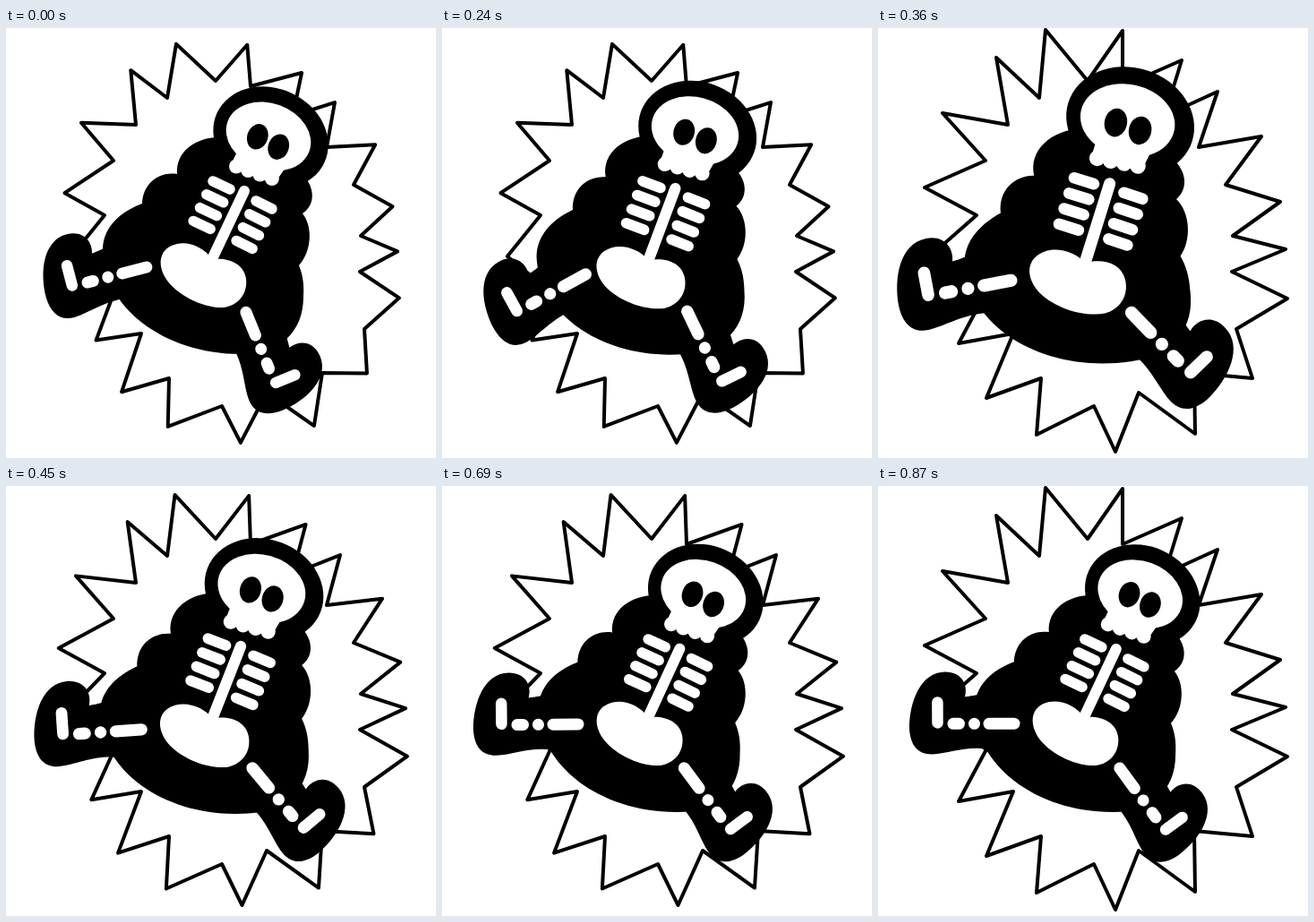
Animation of 480x480 px, one loop 900 ms. Source, as an HTML page with a canvas:

```html
<!DOCTYPE html>
<html lang="en">
<head>
<meta charset="utf-8">
<title>Dancing skeleton</title>
<style>
html, body { margin: 0; width: 100%; height: 100%; overflow: hidden; background: #fff; }
canvas { display: block; width: 480px; height: 480px; }
</style>
</head>
<body>
<canvas id="stage" width="480" height="480"></canvas>
<script>
const ctx = document.getElementById('stage').getContext('2d');
const LOOP = 900, STEP = 30, RAD = Math.PI / 180;

// Corners of the burst at full size: tips, and the notch after each tip.
const tips = [[187,2],[273,3],[339,36],[379,71],[428,121],[449,194],[455,247],[457,302],[418,391],
  [354,453],[265,473],[177,454],[121,413],[90,352],[60,253],[52,178],[72,95],[132,33]];
const notches = [[234,59],[273,65],[320,98],[358,133],[388,175],[396,232],[395,272],[400,336],[353,385],
  [291,407],[241,422],[182,391],[151,341],[121,294],[110,209],[120,148],[145,108],[180,78]];

const torso = new Path2D(`M245 122 C215 120 189 136 191 163 C172 160 153 172 152 196
  C128 205 108 222 108 248 C108 310 175 364 262 364 C305 364 332 340 332 300
  C333 285 331 275 327 265 C341 250 343 222 331 207 C345 198 347 178 328 160 L300 120Z`);
const pelvis = new Path2D(`M230 258 C222 246 205 238 191 241 C172 245 168 262 178 279
  C190 298 220 313 243 312 C258 310 270 298 268 280 C266 264 250 256 230 258Z`);
const jaw = new Path2D('M258 138 L250 155 L268 163 L297 172 L305 166 L316 150Z');

// Both legs share one shape: x runs from hip to foot, toes point to negative y.
const legSkin = new Path2D(`M-8 -30 L34 -34 C44 -31 48 -31 55 -30 C51 -43 58 -58 77 -58
  C104 -58 117 -25 117 5 C116 25 107 34 92 34 C72 33 57 25 30 28 L-13 35Z`);

function smooth(from, to, t) {
  const u = Math.min(1, Math.max(0, (t - from) / (to - from)));
  return u * u * (3 - 2 * u);
}

function poseAt(t) {
  const rise = smooth(80, 360, t);
  const settle = Math.exp(-Math.max(0, t - 360) / 125);
  const lean = rise * settle;
  const puff = rise ** 4 * settle ** 2;
  const kick = 1 - 0.48 * Math.exp(-t / 40);
  return {
    x: 220 + 3 * lean,
    y: 276 + 3 * lean + 4 * puff,
    turn: -8 * lean,
    size: 1 + 0.01 * lean + 0.087 * puff,
    left: -28 * kick * (1 - smooth(190, 400, t)),
    right: 26.5 * kick * (1 - smooth(145, 355, t))
  };
}

function ellipse(x, y, rx, ry, angle, color) {
  ctx.fillStyle = color;
  ctx.beginPath();
  ctx.ellipse(x, y, rx, ry, angle * RAD, 0, Math.PI * 2);
  ctx.fill();
}

function bone(x1, y1, x2, y2, width) {
  ctx.strokeStyle = '#fff';
  ctx.lineWidth = width;
  ctx.beginPath();
  ctx.moveTo(x1, y1);
  ctx.lineTo(x2 + 0.01, y2);
  ctx.stroke();
}

function fillPath(path, color) {
  ctx.fillStyle = color;
  ctx.fill(path);
}

// The tips swell from 0 (small) to 1 (full size); the notches stay put.
function drawBurst(swell) {
  const sx = 0.922 + 0.078 * swell, sy = 0.945 + 0.055 * swell;
  ctx.beginPath();
  tips.forEach(([x, y], i) => {
    ctx.lineTo(225 + (x - 225) * sx, 290 + (y - 290) * sy);
    ctx.lineTo(...notches[i]);
  });
  ctx.closePath();
  ctx.strokeStyle = '#000';
  ctx.lineWidth = 4;
  ctx.stroke();
}

function drawLeg(x, y, angle, flip, offsetX, offsetY) {
  ctx.save();
  ctx.translate(x, y);
  ctx.rotate(angle * RAD);
  ctx.scale(flip, 1);
  ctx.translate(offsetX, offsetY);
  fillPath(legSkin, '#000');
  bone(0, 0, 28, 0, 13);
  bone(44.5, 0, 44.5, 0, 13);
  bone(61.5, 0, 68, 0, 13);
  bone(85.5, -1, 85.5, -24, 12.5);
  ctx.restore();
}

function drawHead() {
  ellipse(295.5, 122.5, 66, 55, 25, '#000');
  ellipse(293, 121, 48.5, 37, 20, '#fff');
  fillPath(jaw, '#fff');
  for (let i = 0; i < 4; i++) ellipse(257 + 13.3 * i, 154.5 + 4.5 * i, 8, 8, 0, '#fff');
  for (const side of [-1, 1]) ellipse(292.5 + 11.7 * side, 127 + 5.7 * side, 11.5, 14.5, 20, '#000');
}

function drawRibs() {
  for (let i = 0; i < 4; i++) {
    const x = -7.3 * i, y = 14.8 * i;
    bone(231 + x, 171 + y, 250 + x, 180 + y, 11.5);
    bone(279 + x, 193 + y, 297 + x, 202 + y, 11.5);
  }
  bone(266, 182, 230, 258, 12);
}

function draw(now) {
  const frame = Math.floor(now % LOOP / STEP);
  const pose = poseAt(frame * STEP);

  ctx.fillStyle = '#fff';
  ctx.fillRect(0, 0, 480, 480);
  ctx.lineCap = ctx.lineJoin = 'round';
  const beat = Math.floor(frame / 2) % 4;
  drawBurst(1 - Math.abs(beat - 2) / 2);

  ctx.save();
  ctx.translate(pose.x, pose.y);
  ctx.rotate(pose.turn * RAD);
  ctx.scale(pose.size, pose.size);
  ctx.translate(-220, -276);
  fillPath(torso, '#000');
  drawLeg(162, 247, pose.left, -1, 10, 18);
  drawLeg(260, 308.5, 54 + pose.right, 1, 11, -4);
  drawHead();
  drawRibs();
  fillPath(pelvis, '#fff');
  ctx.restore();
}

let start;
function tick(now) {
  start ??= now;
  draw(now - start);
  requestAnimationFrame(tick);
}
draw(0);
requestAnimationFrame(tick);
</script>
</body>
</html>
```
